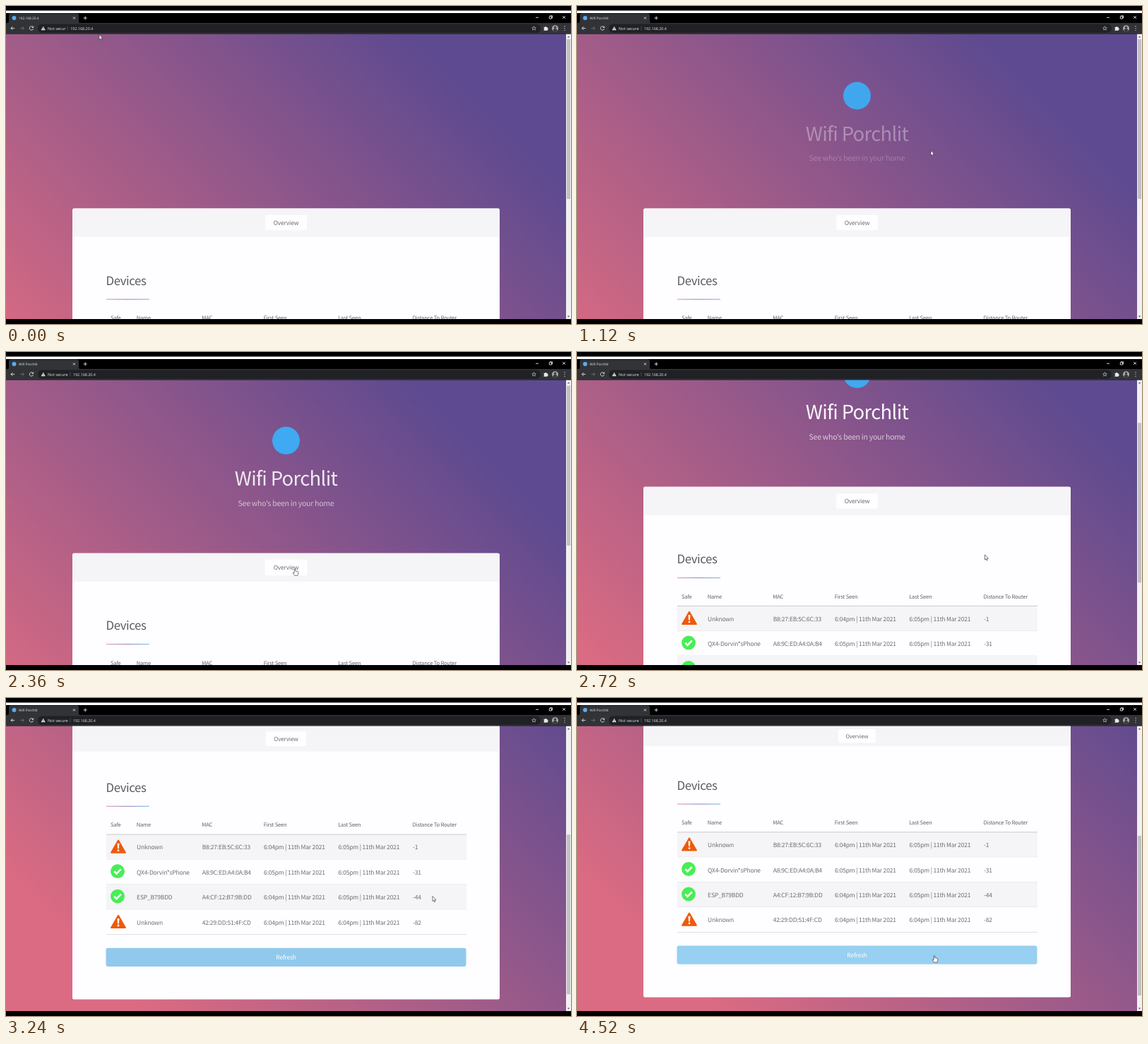
Animation of 800 by 450 pixels, one loop 4.56 s. Source, as an HTML page:

```html
<!DOCTYPE html>
<html lang="en">
<head>
<meta charset="utf-8">
<title>Wifi Porchlit</title>
<style>
  html, body { margin: 0; width: 100%; height: 100%; overflow: hidden; background: #000; }
  svg { display: block; width: 100%; height: 100%; }
  text { text-rendering: geometricPrecision; white-space: pre; }
  .ui { font: 5.4px "Open Sans", sans-serif; fill: #e8eaed; }
  .page { font: 300 8.5px "Noto Sans CJK JP", "Noto Sans CJK SC", "Noto Sans CJK", "Open Sans", sans-serif; fill: #6e6e70; }
  .page text { letter-spacing: -.025em; }
  .page .th { font-size: 7.6px; font-weight: 500; fill: #636363; }
  .mid { text-anchor: middle; }
  .line { fill: none; stroke: #dfe1e5; stroke-width: .9; }
</style>
</head>
<body>
<svg viewBox="0 0 800 450" preserveAspectRatio="none">
  <defs>
    <linearGradient id="sky" gradientUnits="userSpaceOnUse" x1="24" y1="761" x2="769" y2="16">
      <stop offset=".15" stop-color="#db6b82"/><stop offset=".85" stop-color="#5e4a90"/>
    </linearGradient>
    <linearGradient id="rule">
      <stop offset="0" stop-color="#e7a3b5"/><stop offset=".5" stop-color="#a093c4"/><stop offset="1" stop-color="#86c5ec"/>
    </linearGradient>
    <clipPath id="view"><rect y="39.5" width="793" height="403.5"/></clipPath>
    <g id="warn">
      <path d="M0-8.6 9.9 8.6H-9.9Z" fill="#ee5a0c" stroke="#ee5a0c" stroke-width="2" stroke-linejoin="round"/>
      <path d="M-1.5-4.5h3L.9 3H-.9Z" fill="#fff"/><circle cy="5.6" r="1.4" fill="#fff"/>
    </g>
    <g id="safe">
      <circle r="9.9" fill="#48ee55"/>
      <path d="M-4.8.2-1.5 3.5 4.8-3" fill="none" stroke="#fff" stroke-width="2.6"/>
    </g>
  </defs>

  <g clip-path="url(#view)" class="page">
    <g id="doc">
      <rect y="39" width="793" height="700" fill="url(#sky)"/>
      <circle id="logo" r="19.5" fill="#3fa9f2"/>
      <g id="intro" fill="#fff" class="mid">
        <text x="396.5" y="190.5" font-size="27.5">Wifi Porchlit</text>
        <text x="396.5" y="219.3" font-size="10.55" fill-opacity=".72">See who's been in your home</text>
      </g>
      <rect x="94" y="286.4" width="605" height="402" rx="2.5" fill="#fefdff"/>
      <text x="141.5" y="395" font-size="16.9" fill="#5c5c60">Devices</text>
      <rect x="142" y="414.5" width="61" height="1.2" fill="url(#rule)"/>
      <g id="table"></g>
      <rect id="refresh" x="141.5" y="615.6" width="510" height="26.2" rx="3"/>
      <text class="mid" x="396.5" y="632" fill="#fff">Refresh</text>
    </g>
    <path id="bar" fill="#f5f4f6"/>
    <rect id="tab" rx="2.5" fill="#fefdff"/>
    <text id="tabText" class="mid" x="396.5">Overview</text>
  </g>

  <rect x="793" y="39.5" width="7" height="403.5" fill="#f1f1f1"/>
  <rect id="thumb" x="794" width="5" height="226" fill="#c1c1c1"/>
  <path d="M794.8 44.5l1.7-2 1.7 2ZM794.8 438.5l1.7 2 1.7-2Z" fill="#555"/>

  <g class="ui">
    <path d="M0 6.5H800V10H0Z" fill="#fff"/>
    <path d="M0 10H800V24H0Z" fill="#000"/>
    <path d="M0 24H800V39.5H0ZM2 24Q4 24 4 22V13Q4 10.5 6.5 10.5H100.500Q103 10.500 103 13V22Q103 24 105 24Z" fill="#323337"/>
    <rect x="45" y="25.500" width="712" height="12.500" rx="6.200" fill="#202124"/>
    <circle cx="11.500" cy="17" r="3" fill="#55aef0"/>
    <text id="title" x="18" y="18.800" font-size="4.800"></text>
    <path class="line" d="M95 15.500l3 3m0-3-3 3M109.700 17h5m-2.500-2.500v5M750 16.300h4M769.300 14.800h3.200v3.200h-3.200ZM770.300 14.800v-1h3.200v3.200h-1M788.200 14.200l3.600 3.600m0-3.600-3.600 3.600"/>
    <path class="line" d="M12.200 31.500H7m2.500-2.500L7 31.500 9.500 34M38.300 30a2.700 2.700 0 1 0 .3 2.200M38.700 28.500v2h-2"/>
    <path class="line" d="M20.200 31.500h5.200m-2.500-2.500 2.500 2.500-2.500 2.500" style="stroke:#6d6f73"/>
    <path d="M52.700 28.700l3 5.500h-6Z"/><path d="M52.700 30.500v2m0 .5v.7" stroke="#202124" stroke-width=".7"/>
    <text id="secure" x="59" y="33.500" font-size="5.700"></text>
    <path id="split" d="M0 28.500v6" stroke="#5f6368" stroke-width=".7"/>
    <text id="address" y="33.500">192.168.20.4</text>
    <path class="line" style="stroke-width:.6" d="M747.500 28.700l.8 1.900 2 .2-1.500 1.300.5 2-1.800-1.100-1.800 1.100.5-2-1.500-1.300 2-.2Z"/>
    <path d="M761.500 30h1.500a1.100 1.100 0 0 1 2.200 0h1.500v1.500a1.100 1.100 0 0 1 0 2.200v1h-5.200v-1.300a1.100 1.100 0 0 0 0-2Z"/>
    <circle cx="777.500" cy="31.700" r="4.500" fill="#aaa"/>
    <path d="M774.500 35a3 3 0 0 1 6 0 4.500 4.500 0 0 1-6 0Z" fill="#3a3a3c"/><circle cx="777.500" cy="30.300" r="1.700" fill="#3a3a3c"/>
    <path d="M791 28.700h.01m0 2.800h-.01m0 2.800h.01" stroke="#e8eaed" stroke-width="1.200" stroke-linecap="round"/>
  </g>

  <g id="cursor" fill="#fff" stroke="#222" stroke-width=".6" stroke-linejoin="round">
    <path id="arrow" d="M0 0V7.200L1.600 5.700 2.700 8.200 3.800 7.700 2.700 5.300H5Z"/>
    <path id="hand" d="M-.8.600Q0-.5.800.600V3.500Q2 2.800 2.400 3.800 3.500 3.300 3.800 4.400 4.800 4.200 4.800 5.400V7.500L3.900 9.800H-.4L-2.800 6.200Q-2.600 4.900-.8 6.200Z"/>
  </g>
</svg>
<script>
const LOOP = 4560;
const $ = id => document.getElementById(id);
const clamp = u => Math.max(0, Math.min(1, u));
const span = (t, from, length) => clamp((t - from) / length);
const ease = u => 1 - (1 - u) ** 2.6 * (1 + u);
const swing = u => .5 - Math.cos(Math.PI * u) / 2;
const mix = (a, b, u) => a + (b - a) * u;
const set = (el, attrs) => { for (const k in attrs) el.setAttribute(k, attrs[k]); };

const columns = [148, 184.7, 277.3, 364.7, 470.2, 575.5];
const heads = ["Safe", "Name", "MAC", "First Seen", "Last Seen", "Distance To Router"];
const seen = m => `6:0${m}pm | 11th Mar 2021`;
const devices = [
  ["warn", "Unknown", "B8:27:EB:5C:6C:33", seen(4), seen(5), "-1"],
  ["safe", "QX4-Dorvin*sPhone", "A8:9C:ED:A4:0A:B4", seen(5), seen(5), "-31"],
  ["safe", "ESP_B79BDD", "A4:CF:12:B7:9B:DD", seen(4), seen(5), "-44"],
  ["warn", "Unknown", "42:29:DD:51:4F:CD", seen(4), seen(4), "-82"]
];
const ROW = 35.4, TOP = 454.8;
const label = (s, x, y, cls = "") => `<text class="${cls}" x="${x}" y="${y}">${s}</text>`;
const rule = (y, color) => `<rect x="142" y="${y - .4}" width="510" height=".9" fill="${color}"/>`;

$("table").innerHTML = heads.map((s, i) => label(s, columns[i], 444.2, "th")).join("") +
  devices.map(([icon, ...cells], r) => {
    const y = TOP + r * ROW, warn = icon === "warn";
    return `<rect x="142" y="${y}" width="510" height="${ROW}" fill="${r % 2 ? "#fefdff" : "#f5f4f6"}"/>` +
      `<use href="#${icon}" x="${warn ? 159 : 158}" y="${y + (warn ? 17.2 : 16.8)}"/>` +
      cells.map((s, i) => label(s, columns[i + 1] + .4, y + 21.4)).join("") +
      rule(y + ROW, "#dcdbdd");
  }).join("") + rule(TOP, "#c6c5c8");

// Mouse stops: time, x, y
const stops = [
  [80, 132, 40.5], [960, 501, 204.5], [1240, 501, 204.5], [2160, 409, 306.5], [2400, 409, 306.5],
  [2700, 577, 287], [2920, 600, 282], [3240, 604, 280.5], [3640, 604, 280.5], [4240, 506, 364.3]
];
function mouse(t) {
  const i = stops.findIndex(s => s[0] > t);
  if (i < 1) return stops.at(i).slice(1);
  const [a, b] = [stops[i - 1], stops[i]], u = swing(span(t, a[0], b[0] - a[0]));
  return [mix(a[1], b[1], u), mix(a[2], b[2], u)];
}

function draw(t) {
  const scroll = 265 * swing(span(t, 2311, 1000));
  const [mx, my] = mouse(t);

  // The menu bar sticks to the top of the page and shrinks
  const u = span(t, 3140, 300);
  const barY = Math.max(286.4 - scroll, 39.5);
  const barH = mix(40.3, 28.5, u);
  const w = mix(59, 53, u), h = mix(21.5, 19.5, u), midY = barY + barH / 2;
  const tabHit = Math.abs(mx - 396.5) < w / 2 && Math.abs(my - midY) < h / 2;
  const refreshY = 615.6 - scroll;
  const refreshHit = mx > 141.5 && mx < 651.5 && my > refreshY && my < refreshY + 26;
  const grow = tabHit ? .5 : 0;

  set($("doc"), { transform: `translate(0 ${-scroll})` });
  set($("bar"), { d: `M94 ${barY + barH}V${barY + 2.5}q0-2.500 2.500-2.500h600q2.500 0 2.500 2.500V${barY + barH}Z` });
  set($("tab"), { x: 396.5 - w / 2 - grow, y: midY - h / 2 - grow, width: w + 2 * grow, height: h + 2 * grow });
  set($("tabText"), { y: midY + 3.1, "font-size": mix(8.5, 7.6, u) });
  set($("refresh"), { fill: refreshHit ? "#97d0f0" : "#91c9ed" });
  set($("thumb"), { y: 47 + scroll * .5585 });

  const pop = mix(.8, 1, ease(span(t, 100, 500)));
  set($("logo"), { transform: `translate(396.5 127) scale(${pop})`, opacity: ease(span(t, 100, 1250)) });
  set($("intro"), { opacity: ease(span(t, 500, 3000)) });

  const slide = span(t, 0, 100) * 3.7;
  $("title").textContent = t < 80 ? "192.168.20.4" : "Wifi Porchlit";
  $("secure").textContent = t < 80 ? "Not secur" : "Not secure";
  set($("split"), { transform: `translate(${87.3 + slide} 0)` });
  set($("address"), { x: 91.2 + slide });

  const hand = tabHit || refreshHit;
  set($("cursor"), { transform: `translate(${mx} ${my})` });
  set($("hand"), { visibility: hand ? "visible" : "hidden" });
  set($("arrow"), { visibility: hand ? "hidden" : "visible" });
}

function frame() {
  draw(performance.now() % LOOP);
  requestAnimationFrame(frame);
}
frame();
</script>
</body>
</html>
```
